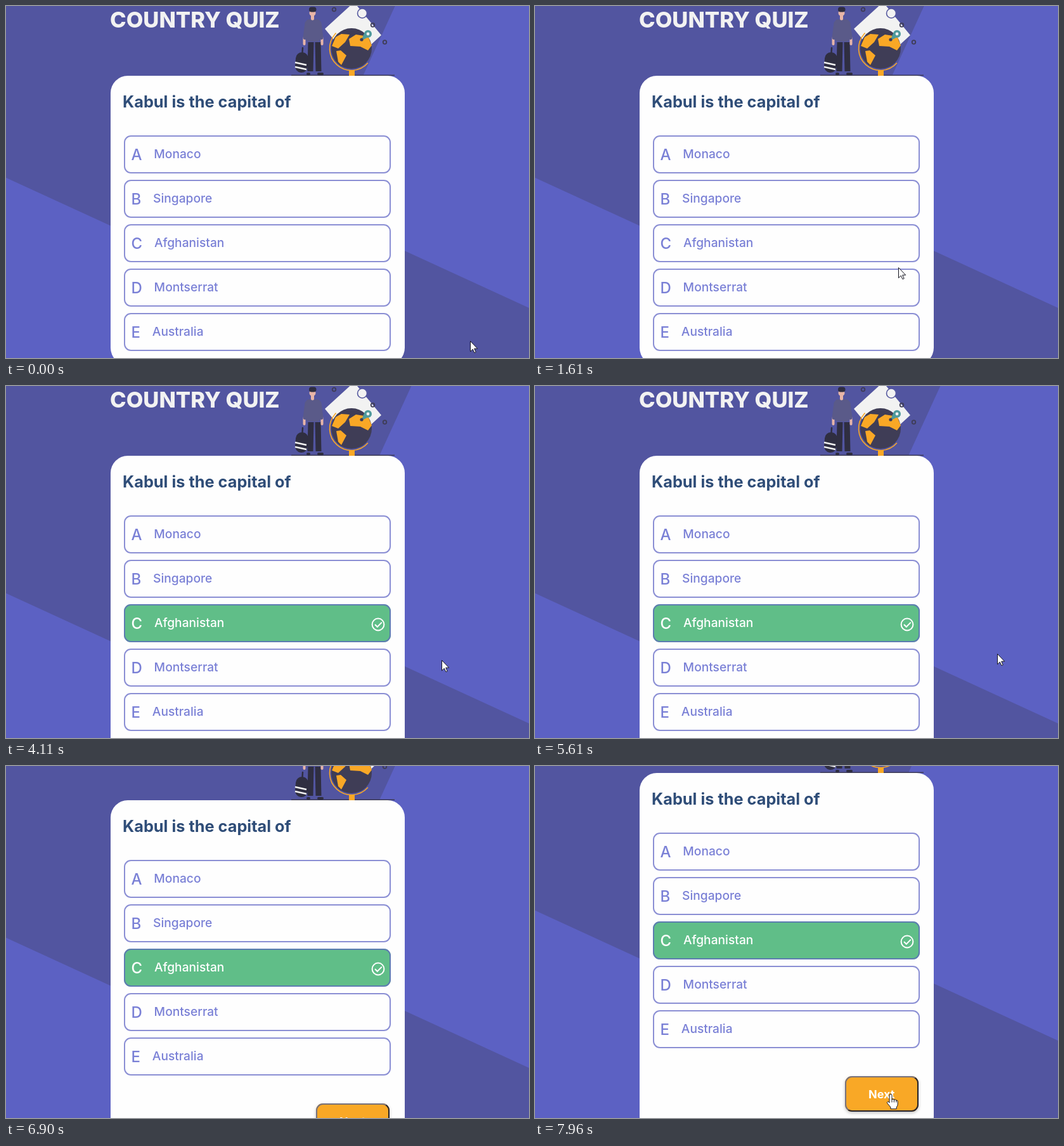
An HTML page with a canvas for the animation above (8 s loop, 825 px wide and 555 px high).

```html
<!DOCTYPE html>
<html lang="en">
<head>
<meta charset="utf-8">
<title>Country quiz</title>
<style>
  html, body { margin: 0; width: 100%; height: 100%; overflow: hidden; background: #5c61c3; }
  canvas { display: block; width: 825px; height: 555px; }
</style>
</head>
<body>
<canvas id="stage" width="825" height="555"></canvas>
<script>
const ctx = document.getElementById('stage').getContext('2d');
const LOOP = 8000, TICK = 66;
const PRESSED = 3310, ANSWERED = 3710;
const FONT = 'Inter, "Open Sans", sans-serif';
const LIGHT = '#5c61c3', DARK = '#5255a0', INK = '#3f3d56', CLOTH = '#2f2e41';
const ORANGE = '#f9a826', GREEN = '#60be88', PAPER = '#f2f2f2', SKIN = '#e8b5a8', TEAL = '#4f9a9c';

const options = ['Monaco', 'Singapore', 'Afghanistan', 'Montserrat', 'Australia'];
const card = { x: 165, y: 110, w: 464, r: 27 };
const row = { x: 186, y: 204, w: 421, h: 60, pitch: 70 };
const next = { x: 489, y: 588, w: 116, h: 56 };

// Pointer path: from, to, and where it ends up
const moves = [
  { from: 70, to: 130, x: 705, y: 493 },
  { from: 330, to: 400, x: 617, y: 434 },
  { from: 930, to: 1150, x: 580, y: 436 },
  { from: 1410, to: 1610, x: 573, y: 412 },
  { from: 2670, to: 3020, x: 506, y: 385 },
  { from: ANSWERED, to: 4110, x: 687, y: 432 },
  { from: 5270, to: 5410, x: 696, y: 432 },
  { from: 5610, to: 5820, x: 826, y: 392 },
  { from: 7000, to: 7000, x: 826, y: 454 },
  { from: 7750, to: 7960, x: 561, y: 517 }
];

const arrow = new Path2D('M.5 .5V16.8L4.3 13.2L6.9 18.7L9.2 17.7L6.7 12.2H11.7Z');
const hand = new Path2D('M-2 14V2.5a2 2 0 0 1 4 0V8.5q2.2-1 3.6 .7q2-.8 3.2 .9q2.4-.3 2.4 2V16q0 3-2 5V23.7H0V21L-5.3 14.7q-.8-2 .9-2.6q1.3-.1 2.4 1.9Z');

const clamp = v => Math.max(0, Math.min(1, v));

// Share of a span that is done, moving once per screen refresh
function stepped(t, from, to) {
  const gaps = Math.round((to - from) / TICK);
  const done = gaps ? Math.floor((t - from) / (to - from) * gaps + 1e-6) : 0;
  return t < from ? 0 : Math.min(1, (done + 1) / (gaps + 1));
}

function pointerAt(t) {
  let x = 732, y = 528;
  for (const m of moves) {
    const p = stepped(t, m.from, m.to);
    x += (m.x - x) * p;
    y += (m.y - y) * p;
  }
  return { x: Math.round(x), y: Math.round(y) };
}

function scrollAt(t) {
  const p = stepped(t, 6620, 7160);
  return p ? Math.round(18 + 81 * ((p * 9 - 1) / 8) ** 1.09) : 0;
}

function hoverAt(i, t) {
  const fade = (on, off) => clamp((t - on) / 150) - clamp((t - off) / 130);
  return i === 2 ? fade(2810, LOOP) : i === 3 ? fade(985, 1477) : 0;
}

function poly(color, ...points) {
  ctx.fillStyle = color;
  ctx.beginPath();
  points.forEach(([x, y]) => ctx.lineTo(x, y));
  ctx.fill();
}

function disc(x, y, r, color, line, width) {
  ctx.beginPath();
  ctx.arc(x, y, r, 0, Math.PI * 2);
  if (color) { ctx.fillStyle = color; ctx.fill(); }
  if (line) { ctx.strokeStyle = line; ctx.lineWidth = width; ctx.stroke(); }
}

function limb(color, x1, y1, x2, y2, width, cap = 'round') {
  ctx.lineCap = cap;
  ctx.strokeStyle = color;
  ctx.lineWidth = width;
  ctx.beginPath();
  ctx.moveTo(x1, y1);
  ctx.lineTo(x2, y2);
  ctx.stroke();
  ctx.lineCap = 'butt';
}

function fillBox(x, y, w, h, r, color) {
  ctx.beginPath();
  ctx.roundRect(x, y, w, h, r);
  ctx.fillStyle = color;
  ctx.fill();
}

function frameBox(x, y, w, h, r, color) {
  ctx.beginPath();
  ctx.roundRect(x + 1, y + 1, w - 2, h - 2, r - 1);
  ctx.strokeStyle = color;
  ctx.lineWidth = 2;
  ctx.stroke();
}

// Returns the x where the text ends
function text(str, x, y, size, weight, color) {
  ctx.font = `${weight} ${size}px ${FONT}`;
  ctx.fillStyle = color;
  ctx.fillText(str, x, y);
  return x + ctx.measureText(str).width;
}

function quadrant(x, y, sign) {
  ctx.save();
  ctx.translate(x, y);
  ctx.rotate(Math.atan(.459));
  ctx.fillStyle = DARK;
  ctx.fillRect(0, 0, sign * 900, sign * 900);
  ctx.restore();
}

function drawBackground(shift) {
  ctx.fillStyle = LIGHT;
  ctx.fillRect(0, 0, 825, 555);
  quadrant(404.3, 456.2 + shift, -1);
  quadrant(410, 285.6 + shift, 1);
}

function drawTraveller() {
  const shirt = '#5a5a89';
  limb(CLOTH, 468, 66, 467, 80, 2.5);
  limb(CLOTH, 467, 83, 466, 95, 20);
  for (const y of [89, 96]) limb(PAPER, 456, y, 474, y + 4, 2.5, 'butt');
  for (const side of [-1, 1]) {
    const x = 486.5 + side * 5.5;
    limb(CLOTH, x, 57, x + side, 103, 9, 'butt');
    limb(CLOTH, x - 2 + side * 3, 107, x + 2 + side * 5, 107, 4);
    limb(SKIN, 484.5 + side * 14, 50, 484.5 + side * 14, 60, 4);
    limb(shirt, 484.5 + side * 10, 27, 484.5 + side * 13, 50, 6);
  }
  fillBox(473, 21, 23, 35, 5, shirt);
  limb(SKIN, 483.5, 12, 483.5, 20, 5);
  disc(483.5, 11, 5, SKIN);
  fillBox(478, 1.5, 11.5, 8, 4, CLOTH);
}

function drawGlobe() {
  poly(PAPER, [503, 36], [549, -6], [592, 46], [546, 88]);
  disc(562, 11.5, 7.5, PAPER, '#55589f', 1.6);
  for (const [x, y] of [[517.5, 5.5], [578.5, 30], [597.5, 57]]) disc(x, y, 2.8, null, INK, 1.8);

  disc(545, 67, 32, INK);
  poly(ORANGE, [514, 63], [520, 49], [529, 44], [542, 45], [535, 57], [524, 67]);
  poly(ORANGE, [521, 71], [528, 70], [537, 78], [529, 93], [524, 88]);
  poly(ORANGE, [541, 52], [552, 45], [571, 48], [577, 62], [571, 70], [559, 64], [543, 63]);
  ctx.beginPath();
  ctx.arc(545, 67, 34.5, Math.PI * .23, Math.PI * 1.25);
  ctx.strokeStyle = ORANGE;
  ctx.lineWidth = 1.6;
  ctx.stroke();
  fillBox(541, 101, 9, 9, 0, ORANGE);

  poly(TEAL, [565, 43], [577, 46], [560, 55]);
  disc(571, 44, 6, TEAL);
  disc(571, 44, 2.4, PAPER);
  disc(561, 53, 2.6, INK);
}

function drawOption(name, i, t) {
  const { x, w, h } = row;
  const y = row.y + row.pitch * i;
  const correct = i === 2 && t >= ANSWERED;
  const hover = hoverAt(i, t);
  ctx.globalAlpha = hover;
  fillBox(x, y, w, h, 11, correct ? GREEN : ORANGE);
  ctx.globalAlpha = 1;
  frameBox(x, y, w, h, 11, 'rgba(92,97,195,.7)');

  const mix = c => Math.round(c + (255 - c) * hover);
  const color = `rgb(${mix(122)},${mix(128)},${mix(214)})`;
  const end = text('ABCDE'[i], x + 11.5, y + 38.5, 24, 500, color);
  text(name, end + 18.8, y + 36, 19.2, 500, color);

  if (correct) {
    disc(587, y + 32, 9.4, null, '#fff', 2);
    ctx.stroke(new Path2D(`M582 ${y + 32}l3.8 3.8l7-7.2`));
  }
}

function drawNext() {
  const { x, y, w, h } = next;
  const cx = x + w / 2, cy = y + h / 2;
  ctx.save();
  ctx.shadowColor = 'rgba(0,0,0,.25)';
  ctx.shadowBlur = 5;
  ctx.shadowOffsetY = 2;
  fillBox(x, y, w, h, 11, ORANGE);
  ctx.restore();
  // Bevel: light above the diagonal, dark below it
  const bevel = ctx.createLinearGradient(cx - h, cy - w, cx + h, cy + w);
  bevel.addColorStop(.5, '#77717a');
  bevel.addColorStop(.5, '#26242c');
  frameBox(x, y, w, h, 11, bevel);
  text('Next', x + 37, cy + 6.5, 18, 700, '#fff');
}

function drawPage(t) {
  const done = t >= ANSWERED;
  text('COUNTRY QUIZ', 164, 33.5, 34.5, 800, PAPER);
  fillBox(450, 108.5, 163, 1.5, 0, INK);
  drawTraveller();
  drawGlobe();
  fillBox(card.x, card.y, card.w, done ? 568 : 456, card.r, '#fefefe');
  text('Kabul is the capital of', 184, 160, 25.3, 700, '#2f4d78');
  options.forEach((name, i) => drawOption(name, i, t));
  if (done) drawNext();
}

function isOver(b, x, y) {
  return x >= b.x && x < b.x + b.w && y >= b.y && y < b.y + b.h;
}

function drawPointer(t, top) {
  const { x, y } = pointerAt(t);
  const overRow = options.some((_, i) => isOver({ ...row, y: row.y + row.pitch * i }, x, y + top));
  const overNext = t >= ANSWERED && isOver(next, x, y + top);
  if (t >= PRESSED && t < PRESSED + 180) disc(x, y, 12, 'rgba(251,213,14,.85)');
  const shape = overRow || overNext ? hand : arrow;
  ctx.save();
  ctx.translate(x, y);
  ctx.fillStyle = '#fff';
  ctx.fill(shape);
  ctx.strokeStyle = '#14141f';
  ctx.lineWidth = 1;
  ctx.stroke(shape);
  if (shape === hand) for (const i of [0, 1, 2]) limb('#14141f', 2 + 3.4 * i, 8.5 + .8 * i, 2 + 3.4 * i, 13, 1);
  ctx.restore();
}

function draw(t) {
  const top = scrollAt(t);
  drawBackground((t >= ANSWERED ? 56 : 0) - top);
  ctx.save();
  ctx.translate(0, -top);
  drawPage(t);
  ctx.restore();
  drawPointer(t, top);
}

const begin = performance.now();
function tick() {
  draw((performance.now() - begin) % LOOP);
  requestAnimationFrame(tick);
}
tick();
</script>
</body>
</html>
```
